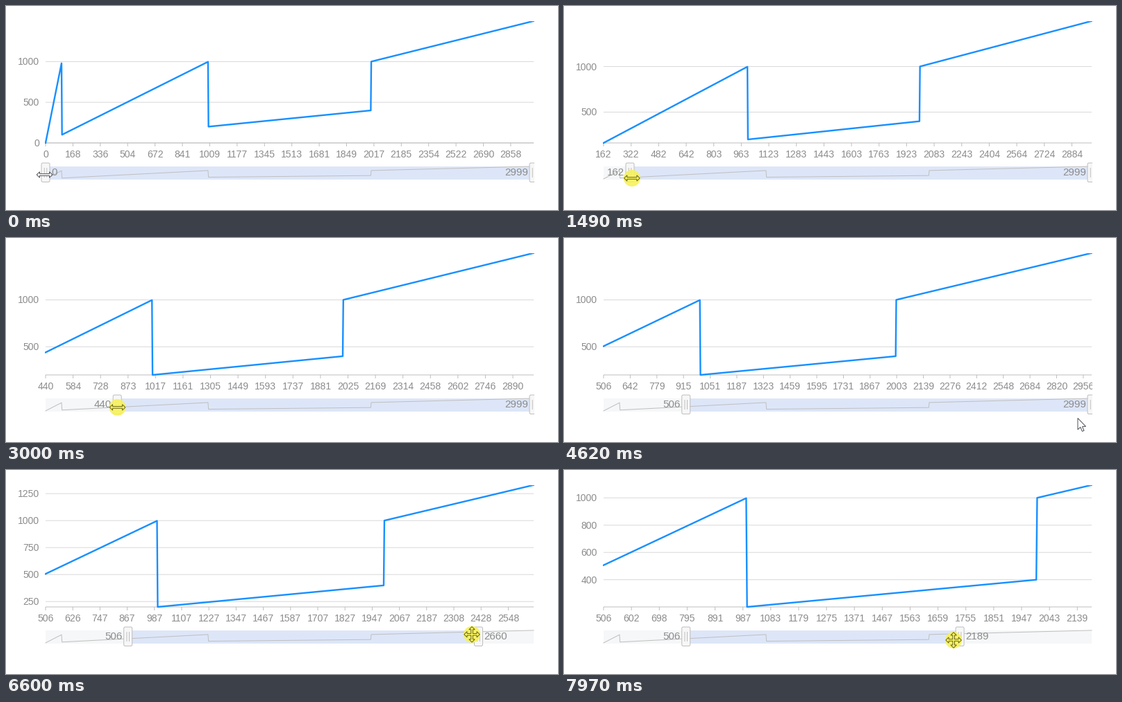
These frames come from a looping animation (795x295 px, 8000 ms). A matplotlib script:

```python
import numpy as np
import matplotlib.pyplot as plt
from matplotlib.animation import FuncAnimation
from matplotlib.collections import LineCollection
from matplotlib.patches import Circle, FancyBboxPatch, Polygon, Rectangle

W, H, DPI = 795, 295, 100
FRAME_MS, LOOP_MS = 20, 8000
LEFT, RIGHT, TOP, BOTTOM = 57, 760, 21.7, 198
LAST = 2999
UNIT = 4.0026   # spacing of the sampled records
STEP = 68.5     # ms between two updates while the mouse moves
GREY, AXIS, GRID, BLUE = "#8c8c8c", "#bfbfbf", "#d9d9d9", "#1890ff"
YELLOW = "#f7f25a"

# four ramps through the origin, each cut off at the next edge
EDGES = np.array([-1, 100, 1000, 2000, LAST + 2])
DATA_X = np.column_stack([EDGES[:-1] + 1, EDGES[1:] - 2]).ravel()
DATA_Y = DATA_X * np.repeat([10, 1, 0.2, 0.5], 2)

# spans in which the mouse moves
RUNS = [(0, 0), (530, 2400), (2870, 3140), (3280, 3350), (4480, 4830),
        (5490, 7160), (7350, LOOP_MS)]
START = [(470, 0), (1489, 162.1), (2400, 414), (3007, 440.3), (3350, 506.37)]
END = [(5420, LAST), (5970, 2917), (7160, 2420), (7350, 2408), (7966, 2189)]
# mouse offset from the right handle, and its height
GRIP = [(5490, -3, 242), (5970, -13, 236), (7350, -5, 240), (7966, -9, 246)]

ARM = np.array([(1.3, -1.3), (7, -1.3), (7, -4.2), (11.3, 0), (7, 4.2), (7, 1.3)])
ARROW = np.array([(0, 0), (0, 16.5), (3.8, 13), (6.4, 19), (9, 18),
                  (6.5, 12.2), (11.5, 12)])


def star(arms):
    """Arrow heads evenly spread around the centre."""
    turns = np.arange(arms) * 2 * np.pi / arms
    return np.vstack([ARM @ np.array([(np.cos(a), np.sin(a)),
                                      (-np.sin(a), np.cos(a))]) for a in turns])


RESIZE, MOVE = star(2), star(4)

fig = plt.figure(figsize=(W / DPI, H / DPI), dpi=DPI, facecolor="white")
ax = fig.add_axes([0, 0, 1, 1])
ax.set_xlim(0, W)
ax.set_ylim(H, 0)
ax.axis("off")

canvas = Rectangle((0, 0), 761, H, transform=ax.transData)
plot = Rectangle((LEFT - 1, 22), 705, 178, transform=ax.transData)


def px(size):
    return size * 72 / DPI


def add(artist, clip=canvas):
    ax.add_artist(artist)
    artist.set_clip_path(clip)
    return artist


def label(size, ha, y=0, z=3):
    t = ax.text(0, y, "", family="Liberation Sans", fontsize=px(size),
                color=GREY, ha=ha, va="baseline", zorder=z, clip_on=True)
    t.set_clip_path(canvas)
    return t


def lines(color, z):
    return add(LineCollection([], colors=color, linewidths=px(1), zorder=z,
                              snap=False))


def slider_x(value):
    return LEFT + (RIGHT - LEFT) * value / LAST


class Handle:
    def __init__(self):
        self.box = add(FancyBboxPatch((0, 227), 12, 27.5,
                                      boxstyle="round,pad=0,rounding_size=2",
                                      fc="#f7f7f7", ec=AXIS, lw=px(1), zorder=7))
        self.grip = lines(AXIS, 8)

    def place(self, x):
        self.box.set_x(x - 6)
        self.grip.set_segments([[(x + d, 234), (x + d, 248)] for d in (-1.8, 1.8)])


grid = lines(GRID, 1)
axis = lines(AXIS, 2)
curve, = ax.plot([], [], color=BLUE, lw=px(2.4), zorder=4, solid_joinstyle="round")
curve.set_clip_path(plot)
x_labels = [label(14, "center") for _ in range(20)]
y_labels = [label(14, "right") for _ in range(8)]

add(Rectangle((LEFT, 232), RIGHT - LEFT, 19, fc="#f5f7f8", lw=0, zorder=1))
window = add(Rectangle((LEFT, 232), 0, 19, fc="#dde6f8", lw=0, zorder=2))
trend, = ax.plot(slider_x(DATA_X), 250 - DATA_Y * 0.0121, color=AXIS,
                 lw=px(1), zorder=3)
trend.set_clip_path(canvas)
start_handle, end_handle = Handle(), Handle()
start_text, end_text = (label(15, "left", 245.3, 6) for _ in range(2))

spot = ax.add_patch(Circle((0, 0), 12, fc=YELLOW, alpha=0.9, lw=0, zorder=9))
cursor = ax.add_patch(Polygon(RESIZE, closed=True, lw=px(0.9), zorder=10))


def stepped(t):
    first, last = [r for r in RUNS if r[0] <= t][-1]
    return min(first + (t - first) // STEP * STEP, last)


def track(keys, t):
    ts, *values = zip(*keys)
    return [np.interp(t, ts, v) for v in values]


def fill(pool, items):
    for text in pool:
        text.set_visible(False)
    for text, (x, y, value) in zip(pool, items):
        text.set_position((x, y))
        text.set_text(f"{value:.0f}")
        text.set_visible(True)


def draw_chart(s, e):
    inside = (DATA_X > s) & (DATA_X < e)
    xs = np.concatenate([[s], DATA_X[inside], [e]])
    ys = np.interp(xs, DATA_X, DATA_Y)
    low, high = ys.min(), ys.max()

    def to_x(v):
        return LEFT + (RIGHT - LEFT) * (v - s) / (e - s)

    def to_y(v):
        return BOTTOM - (BOTTOM - TOP) * (v - low) / (high - low)

    curve.set_data(to_x(xs), to_y(ys))

    span = high - low
    step = 500 if span > 1150 else 250 if span > 950 else 200
    rows = np.arange(np.ceil(low / step) * step, high, step)
    grid.set_segments([[(LEFT, to_y(v)), (RIGHT, to_y(v))] for v in rows])
    fill(y_labels, [(48, to_y(v) + 5, v) for v in rows])

    slots = 18.4 if e == LAST and s > 500 else 18
    every = UNIT * np.ceil((e - s) / UNIT / slots)
    cols = np.arange(s, e, every)
    axis.set_segments([[(LEFT, BOTTOM), (RIGHT, BOTTOM)]]
                      + [[(to_x(v), BOTTOM), (to_x(v), 203)] for v in cols])
    fill(x_labels, [(to_x(v), 219.3, v) for v in cols])


def draw_slider(s, e):
    a, b = slider_x(s), slider_x(e)
    window.set_x(a)
    window.set_width(b - a)
    start_handle.place(a)
    end_handle.place(b)
    # a value stands outside the window if there is room for it
    for text, x, value, side in ((start_text, a, s, -1), (end_text, b, e, 1)):
        word = f"{value:.0f}"
        reach = x + side * (8 + 8.3 * len(word))
        if not LEFT <= reach <= RIGHT:
            side = -side
        text.set_text(word)
        text.set_x(x + 8 * side)
        text.set_ha("left" if side > 0 else "right")


def mouse_at(t, q, s, e):
    if t < 4220:      # drags the left handle
        sway = np.sin(np.pi * np.clip((q - 530) / 2820, 0, 1))
        return slider_x(s) - 1.5 + 5 * sway, 244 + 6.5 * sway ** 2
    if t < 4480:
        return 245, 269
    if t < 5490:      # glides to the right handle
        rest = 1 - (q - 4480) / 350
        return 757 - 59 * rest ** 2.5, 242 + 39 * rest ** 1.5
    shift, y = track(GRIP, q)
    return slider_x(e) + shift, y


def draw_mouse(t, x, y, s, e):
    pressed = 70 <= t < 3950 or t >= 5290
    gap = min(abs(x - slider_x(v)) for v in (s, e))
    if 4220 <= t < 4830:
        shape = ARROW
    else:
        shape = MOVE if gap > 7 else RESIZE
    cursor.set_xy(shape + (x, y))
    cursor.set_facecolor(YELLOW if pressed else "white")
    cursor.set_edgecolor("#5c5a1e" if pressed else "#3c4048")
    cursor.set_visible(not 4280 <= t < 4480)
    spot.center = x, y
    spot.set_visible(pressed)


def update(i):
    t = (i + 0.5) * FRAME_MS
    q = stepped(t)
    s, = track(START, q)
    e, = track(END, q)
    draw_chart(s, e)
    draw_slider(s, e)
    draw_mouse(t, *mouse_at(t, q, s, e), s, e)


anim = FuncAnimation(fig, update, frames=LOOP_MS // FRAME_MS, interval=FRAME_MS,
                     repeat=True, repeat_delay=0, cache_frame_data=False)
plt.show()
```
